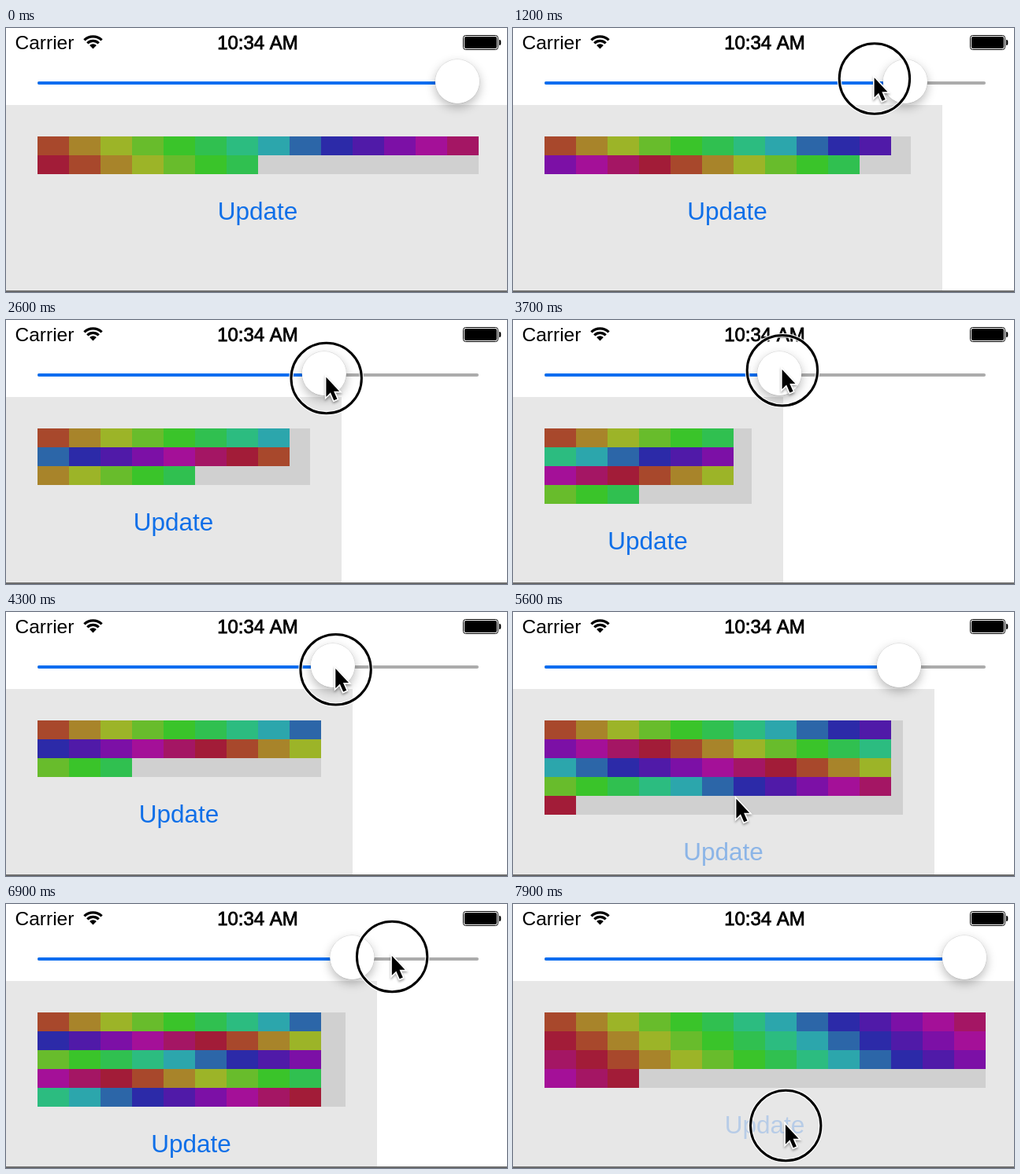
Write an HTML page with a canvas that moves like this. It is 636 by 336 pixels and loops after 8 s.

```html
<!DOCTYPE html>
<html lang="en">
<head>
<meta charset="utf-8">
<title>Flow layout</title>
<style>
html, body { margin: 0; width: 636px; height: 336px; overflow: hidden; background: #fff; }
canvas { display: block; }
</style>
</head>
<body>
<canvas id="stage" width="636" height="336"></canvas>
<script>
const ctx = document.getElementById("stage").getContext("2d");
const LOOP = 8000, STEP = 100, TAU = Math.PI * 2;
const FONT = '"Liberation Sans", Arial, sans-serif';
const HUES = ["#a8482c", "#a8842a", "#9cb428", "#68bc2c", "#3ac42a",
  "#30c050", "#2cbc80", "#2ca6ac", "#2c66a8", "#2c2aa8",
  "#501aa8", "#7c10a6", "#a41098", "#a41664", "#a21c38"];

// Panel width at the rests and turns of the drag: [time, width]
const WIDTHS = [[1000, 640], [1400, 450], [1800, 530], [2000, 530], [2100, 599],
  [2180, 628], [2600, 426], [3200, 405], [3400, 405], [3700, 343], [3780, 343],
  [4300, 440], [4400, 440], [4900, 535], [6300, 535], [6700, 400], [6900, 471],
  [7100, 640]];
const LAG = 80;              // the thumb trails the pointer
const RELEASE = 5600;        // first tap on the button ends
const BUTTON = [[345, 236], [283, 235], [345.5, 278]];

const ease = p => p * p * (3 - 2 * p);
const mix = (a, b, p) => a + (b - a) * p;
const clamp = p => Math.min(1, Math.max(0, p));
const within = (t, from, to) => t >= from && t < to;

function widthAt(t) {
  const i = WIDTHS.findIndex(key => t <= key[0]);
  if (i === 0) return WIDTHS[0][1];
  if (i < 0) return WIDTHS[WIDTHS.length - 1][1];
  const [t0, a] = WIDTHS[i - 1], [t1, b] = WIDTHS[i];
  return mix(a, b, ease((t - t0) / (t1 - t0)));
}

const thumbX = width => 67 + 506 * width / 640;

function dragPoint(t) {
  const x = thumbX(widthAt(t + LAG)) + 3;
  return [x, 65 + 5 * Math.cos(TAU * (x - 407) / 120)];
}

function glide(t, from, to, a, b) {
  const p = ease(clamp((t - from) / (to - from)));
  return [mix(a[0], b[0], p), mix(a[1], b[1], p)];
}

function pointerAt(t) {
  if (t < 500) return glide(t, 100, 500, BUTTON[0], dragPoint(500));
  if (t < 4900) return dragPoint(t);
  if (t < 5700) return glide(t, 4900, 5300, dragPoint(4900), BUTTON[1]);
  if (t < 6200) return glide(t, 5700, 6200, BUTTON[1], dragPoint(6200));
  if (t < 7200) return dragPoint(t);
  return glide(t, 7200, 7800, dragPoint(7200), BUTTON[2]);
}

const dragging = t => within(t, 500, 4900) || within(t, 6200, 7200);
const tapping = t => within(t, 5400, RELEASE) || t >= 7800;

function buttonAlpha(t) {
  if (tapping(t)) return .22;
  return t < RELEASE ? 1 : clamp(.42 + (t - RELEASE) / 350);
}

function rect(x, y, w, h, color) {
  ctx.fillStyle = color;
  ctx.fillRect(x, y, w, h);
}

function pill(x, y, w, h, r, color) {
  ctx.fillStyle = color;
  ctx.beginPath();
  ctx.roundRect(x, y, w, h, r);
  ctx.fill();
}

function text(str, x, y, size, align, color) {
  ctx.font = size + "px " + FONT;
  ctx.textAlign = align;
  ctx.fillStyle = color;
  ctx.fillText(str, x, y);
}

function arc(x, y, r, width, color, from = 0, to = TAU) {
  ctx.lineWidth = width;
  ctx.strokeStyle = color;
  ctx.beginPath();
  ctx.arc(x, y, r, from, to);
  ctx.stroke();
}

function statusBar() {
  text("Carrier", 11.5, 27, 24.5, "left", "#000");
  text("10:34 AM", 319.5, 27, 24, "center", "#000");
  ctx.lineWidth = .8;
  ctx.strokeStyle = "#000";
  ctx.strokeText("10:34 AM", 319.5, 27);

  // Signal fan
  const cx = 110.5, cy = 26.5, from = -TAU * 3 / 8, to = -TAU / 8;
  for (const r of [10.2, 15.7]) arc(cx, cy, r, 3.2, "#000", from, to);
  ctx.fillStyle = "#000";
  ctx.beginPath();
  ctx.moveTo(cx, cy);
  ctx.arc(cx, cy, 6.2, from, to);
  ctx.fill();

  // Battery
  ctx.lineWidth = 1;
  ctx.beginPath();
  ctx.roundRect(580.5, 9.5, 44, 18, 3);
  ctx.stroke();
  pill(582, 11, 41, 15, 2, "#000");
  pill(626, 15, 2.3, 7, [0, 2, 2, 0], "#000");
}

function panel(width, count, alpha) {
  const inner = width - 80;
  const cols = Math.floor(inner / 40);
  const bottom = 138 + Math.ceil(count / cols) * 24;
  rect(0, 98, width, 238, "#e7e7e7");
  rect(40, 138, inner, bottom - 138, "#d0d0d0");
  for (let i = 0; i < count; i++) {
    rect(40 + i % cols * 40, 138 + Math.floor(i / cols) * 24, 40, 24, HUES[i % HUES.length]);
  }
  ctx.globalAlpha = alpha;
  text("Update", width / 2 - .5, bottom + 58, 31.5, "center", "#0f6fe8");
  ctx.globalAlpha = 1;
}

function slider(x) {
  pill(40, 68, 560, 4, 2, "#acacac");
  pill(40, 68, x - 40, 4, 2, "#0a6df0");
  ctx.save();
  ctx.shadowColor = "rgba(0,0,0,.28)";
  ctx.shadowBlur = 13;
  ctx.shadowOffsetY = 5;
  pill(x - 28, 40, 56, 56, 28, "#fff");
  ctx.restore();
  arc(x, 68, 28, .8, "rgba(0,0,0,.16)");
  pill(x - 28, 40, 56, 56, 28, "#fff");
}

function pointer([x, y], pressed) {
  if (pressed) {
    arc(x + .7, y + 4, 44.7, 5.4, "rgba(255,255,255,.85)");
    arc(x + .7, y + 4, 44.7, 3, "#000");
  }
  const arrow = new Path2D("M1 2V29L7 23.2L11.7 34L16.2 32L11.5 21.5H19.2Z");
  ctx.save();
  ctx.translate(x - .5, y + 1);
  ctx.scale(.92, .92);
  ctx.lineWidth = 3.6;
  ctx.strokeStyle = "#fff";
  ctx.shadowColor = "rgba(0,0,0,.35)";
  ctx.shadowBlur = 3;
  ctx.shadowOffsetY = 2;
  ctx.stroke(arrow);
  ctx.shadowColor = "transparent";
  ctx.fillStyle = "#000";
  ctx.fill(arrow);
  ctx.restore();
}

function draw(t) {
  const width = widthAt(t);
  rect(0, 0, 636, 336, "#fff");
  statusBar();
  panel(Math.round(width), t < RELEASE ? 21 : 45, buttonAlpha(t));
  slider(thumbX(width));
  rect(0, 334, 636, 2, "#6c6c6c");
  if (t >= STEP) pointer(pointerAt(t), dragging(t) || tapping(t));
}

const start = performance.now();
function tick() {
  const t = (performance.now() - start) % LOOP;
  draw(Math.floor(t / STEP) * STEP);
  requestAnimationFrame(tick);
}
tick();
</script>
</body>
</html>
```
